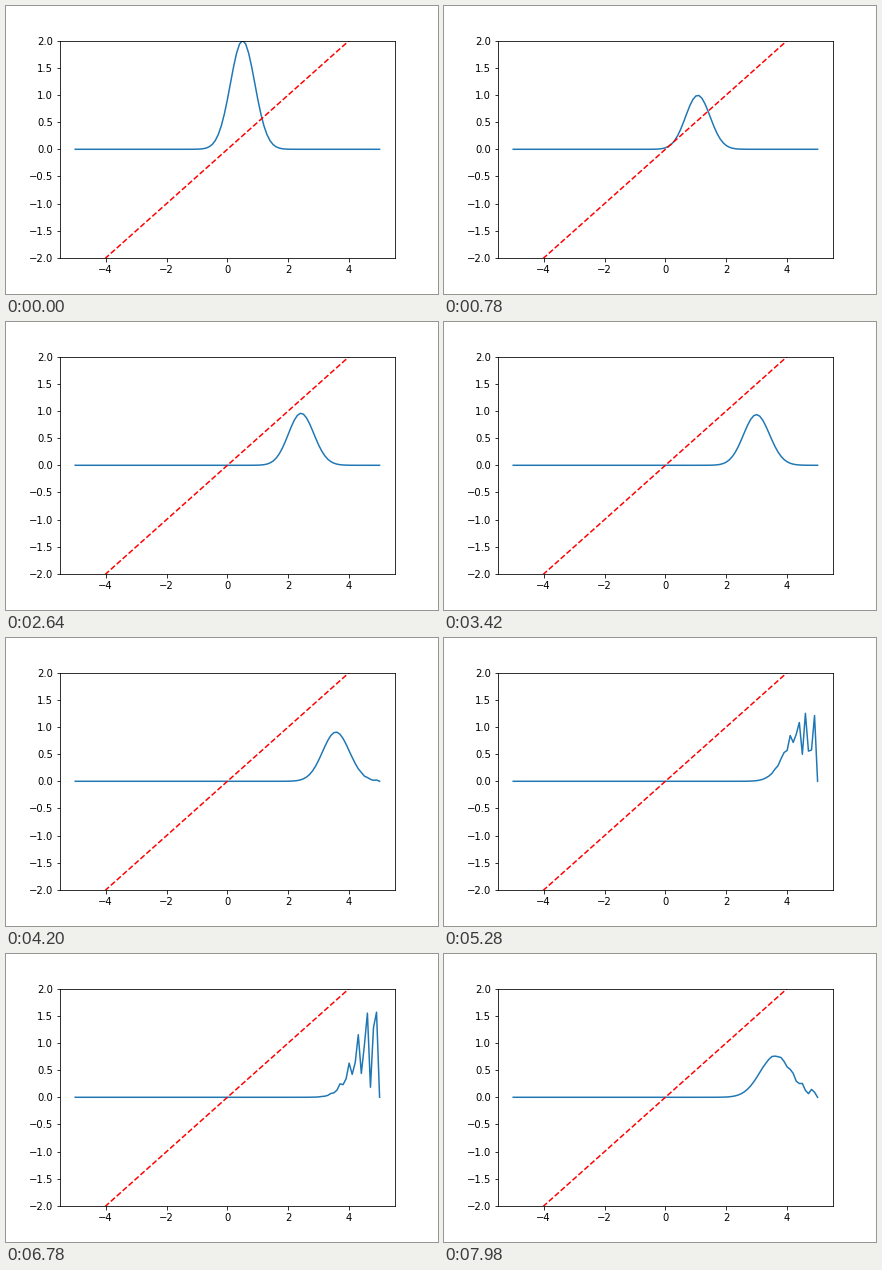
Recreate the animation shown at these times as a matplotlib script. Size 432 by 288 pixels, loop 8000 ms.

```python
import numpy as np
import matplotlib.pyplot as plt
from matplotlib.animation import FuncAnimation

# Gaussian packet on a grid with hard walls and a linear potential
N = 101
x = np.linspace(-5, 5, N)
dx = x[1] - x[0]
V = 0.5 * x
X0, SIGMA, K0 = 0.5, 0.4, 20.0

DT = 0.0025
STEPS_PER_POSE = 2
TICK = 20            # ms per animation frame
TICKS_PER_POSE = 3   # a pose lasts 60 ms
LOOP = 8000


def evolve(poses):
    """Crank-Nicolson evolution; returns the probability density per pose."""
    n = N - 2
    lap = (np.eye(n, k=1) + np.eye(n, k=-1) - 2 * np.eye(n)) / dx**2
    H = -0.5 * lap + np.diag(V[1:-1])
    half = 0.5j * DT * H
    step = np.linalg.solve(np.eye(n) + half, np.eye(n) - half)
    step = np.linalg.matrix_power(step, STEPS_PER_POSE)

    start = np.sqrt(2) * np.exp(-((x - X0) / (2 * SIGMA))**2 + 1j * K0 * x)
    density = np.zeros((poses, N))
    density[0] = np.abs(start)**2      # first pose is not normalised
    psi = start[1:-1] / np.sqrt(np.sum(np.abs(start)**2) * dx)
    for i in range(1, poses):
        psi = step @ psi
        density[i, 1:-1] = np.abs(psi)**2
    return density


ticks = LOOP // TICK
density = evolve((ticks - 1) // TICKS_PER_POSE + 1)

fig, ax = plt.subplots(figsize=(6, 4), dpi=72)
fig.subplots_adjust(left=0.125, right=0.9, bottom=0.125, top=0.88)
line, = ax.plot(x, density[0])
ax.plot(x, V, "r--")
ax.set_xlim(-5.5, 5.5)
ax.set_ylim(-2, 2)


def update(tick):
    line.set_ydata(density[tick // TICKS_PER_POSE])
    return line,


anim = FuncAnimation(fig, update, frames=ticks, interval=TICK,
                     repeat=True, repeat_delay=0)
plt.show()
```
